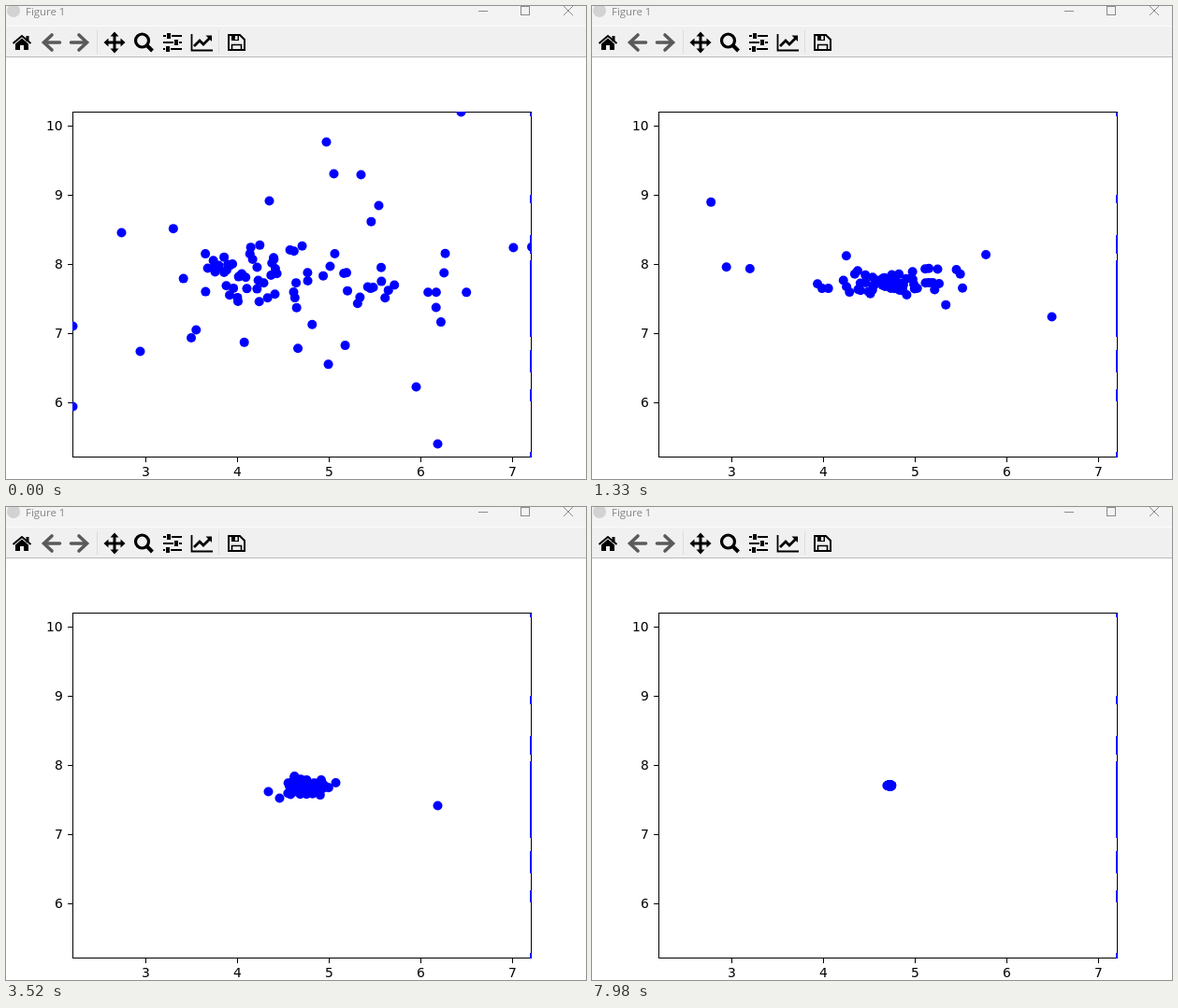
Animation, 620 px wide and 506 px high, one loop 8000 ms. Source, as an HTML page with a canvas:

```html
<!DOCTYPE html>
<html lang="en">
<head>
<meta charset="utf-8">
<title>Figure 1</title>
<style>
html, body { margin: 0; width: 100%; height: 100%; overflow: hidden; background: #fff; }
canvas { display: block; width: 620px; height: 506px; }
</style>
</head>
<body>
<canvas id="stage" width="620" height="506"></canvas>
<script>
const ctx = document.getElementById("stage").getContext("2d");
const LOOP = 8000, COUNT = 97, BLUE = "#0000ff", INK = "#000", BAR = "#f0f0f0";
const GOAL = [317, 297];
const AXES = { l: 71, t: 113, r: 561, b: 482 };
const LABEL = '13.89px "DejaVu Sans", sans-serif';

// The swarm moves in discrete iterations, held for one or two ticks each
const stepAt = t => Math.floor(Math.floor(t / 66.3 + 0.1) * 0.62 + 0.6);

// Shape of the swarm over time: a few stragglers, a wide cloud and a dense core.
// Clouds are [centre x, centre y, deviation x, deviation y, slope].
const POSES = [
  { t: 0, spread: 50, wide: [330, 303, 95, 32, 0], core: [255, 280, 32, 16, 0],
    far: [[486, 113], [342, 145], [350, 179], [379, 180], [281, 208], [398, 213],
      [438, 407], [461, 468], [71, 342], [71, 428], [143, 369], [123, 242]] },
  { t: 790, spread: 40, wide: [320, 297, 90, 18, 0.1], core: [315, 297, 22, 6, 0.12],
    far: [[71, 222], [78, 224], [124, 271], [281, 214], [561, 387], [493, 403],
      [489, 382], [532, 305], [476, 273], [464, 353]] },
  { t: 1990, spread: 18, wide: [310, 298, 40, 12, 0.1], core: [316, 298, 10, 4, 0.1],
    far: [[96, 333], [194, 302], [205, 271], [242, 241], [491, 404], [352, 348], [392, 308]] },
  { t: 3520, spread: 14, wide: [325, 299, 15, 4, 0.1], core: [314, 298, 6, 4, 0.05],
    far: [[461, 319], [280, 304], [292, 311]] },
  { t: 4850, spread: 8, wide: [310, 297, 10, 2.5, 0.1], core: [315, 297.5, 5, 1.2, 0.15],
    far: [[259, 291], [286, 283], [354, 312]] },
  { t: 5910, spread: 8, wide: [317, 298, 5, 4, 0.3], core: [317, 297.5, 3.5, 1, 0.1],
    far: [[272, 293]] },
  { t: 7980, spread: 4, wide: [318, 297.5, 1.6, 0.3, 0], core: [317.5, 297.5, 1, 0.3, 0], far: [] }
];

let seed = 11;
function random() {
  seed = (seed * 16807) % 2147483647;
  return seed / 2147483647;
}
const bell = () => 2 * (random() + random() + random()) - 3;

function scatter([cx, cy, sx, sy, slope]) {
  const dx = bell() * sx;
  return [cx + dx, cy + bell() * sy + dx * slope];
}

for (const pose of POSES) {
  pose.step = stepAt(pose.t);
  const edge = pose.far.length + pose.spread;
  pose.dots = Array.from({ length: COUNT }, (_, i) =>
    pose.far[i] || scatter(i < edge ? pose.wide : pose.core));
}
const phases = Array.from({ length: COUNT }, () => random() * 2 - 1);

// Each dot swings through the goal on its way from one pose to the next
function place(i, a, b, u) {
  const turns = [i % 3, ((i * 7) >> 2) % 3];
  return GOAL.map((c, k) => {
    const mid = a.dots[i][k] * (1 - u) + b.dots[i][k] * u;
    const angle = 2 * Math.PI * turns[k] * u + phases[i] * Math.sin(Math.PI * u);
    return c + (mid - c) * Math.cos(angle);
  });
}

function rect(color, x, y, w, h) {
  ctx.fillStyle = color;
  ctx.fillRect(x, y, w, h);
}

function disc(color, x, y, r) {
  ctx.fillStyle = color;
  ctx.beginPath();
  ctx.arc(x, y, r, 0, 2 * Math.PI);
  ctx.fill();
}

function line(color, width, ...pts) {
  ctx.strokeStyle = color;
  ctx.lineWidth = width;
  ctx.beginPath();
  for (let i = 0; i < pts.length; i += 2) ctx.lineTo(pts[i], pts[i + 1]);
  ctx.stroke();
}

function shape(color, ...pts) {
  ctx.fillStyle = color;
  ctx.beginPath();
  for (let i = 0; i < pts.length; i += 2) ctx.lineTo(pts[i], pts[i + 1]);
  ctx.fill();
}

// Text placed on whole pixels; align is the share of its width left of x
function text(str, x, y, font, color, align) {
  ctx.font = font;
  ctx.fillStyle = color;
  ctx.fillText(str, Math.round(x - ctx.measureText(str).width * align), y);
}

function drawTitleBar() {
  const grey = "#8a8a8a";
  rect("#f3f3f3", 0, 0, 620, 21);
  rect("#fbfbfb", 0, 21, 620, 1);
  disc("#d2d2d2", 8, 5, 7);
  text("Figure 1", 21, 10, '11.4px "Open Sans", sans-serif', "#858585", 0);
  line(grey, 1, 505, 5.5, 515, 5.5);
  ctx.strokeRect(550.5, 0.5, 9, 9);
  line(grey, 1, 596, 0, 606, 10);
  line(grey, 1, 606, 0, 596, 10);
}

function drawHome() {
  line(INK, 2, 7.5, 40, 17, 32, 26.5, 40);
  rect(INK, 21.5, 32, 3, 6);
  shape(INK, 17, 34.5, 24, 40.5, 24, 47, 19, 47, 19, 42, 15, 42, 15, 47, 10, 47, 10, 40.5);
}

function drawArrow(x, dir) {
  const grey = "#5a5a5a";
  ctx.lineCap = "round";
  line(grey, 3.6, x + dir * 8.5, 31, x, 39, x + dir * 8.5, 47);
  line(grey, 3.6, x + dir, 39, x + dir * 17, 39);
  ctx.lineCap = "butt";
}

function drawPan() {
  rect(INK, 108, 37.5, 16, 3);
  rect(INK, 114.5, 31, 3, 16);
  for (let i = 0; i < 4; i++) {
    ctx.save();
    ctx.translate(116, 39);
    ctx.rotate(i * Math.PI / 2);
    shape(INK, 0, -11.5, 4.5, -6.5, -4.5, -6.5);
    ctx.restore();
  }
}

function drawZoom() {
  ctx.strokeStyle = INK;
  ctx.lineWidth = 3.2;
  ctx.beginPath();
  ctx.arc(145.5, 37, 7, 0, 2 * Math.PI);
  ctx.stroke();
  line(INK, 4, 150.5, 42, 156.5, 48);
}

function drawSliders() {
  [174, 182, 173].forEach((x, i) => {
    const y = 32 + i * 7;
    rect(INK, 168, y - 1, 20, 2);
    rect(BAR, x - 3, y - 1, 6, 2);
    rect(INK, x - 2, y - 3, 4, 6);
  });
}

function drawChart() {
  line(INK, 1.8, 198.5, 30, 198.5, 47.5, 221, 47.5);
  line(INK, 2.8, 201, 43, 207, 37, 211, 41, 218, 34);
  shape(INK, 213.5, 31.5, 220, 31.5, 220, 38);
}

function drawSave() {
  line(INK, 2, 238, 31, 250, 31, 255, 36, 255, 47, 238, 47, 238, 30);
  rect(INK, 241, 31, 8, 6);
  rect(BAR, 245, 32, 2.5, 4);
  line(INK, 1.6, 241.5, 47, 241.5, 41.5, 251.5, 41.5, 251.5, 47);
}

function drawToolbar() {
  rect(BAR, 0, 22, 620, 32);
  rect("#b9b9b9", 0, 54, 620, 1);
  for (const x of [97, 227]) rect("#dcdcdc", x, 26, 1, 25);
  drawHome();
  drawArrow(40.5, 1);
  drawArrow(86.5, -1);
  drawPan();
  drawZoom();
  drawSliders();
  drawChart();
  drawSave();
}

function drawAxes() {
  const { l, t, r, b } = AXES;
  ctx.strokeStyle = INK;
  ctx.lineWidth = 1;
  ctx.strokeRect(l + 0.5, t + 0.5, r - l, b - t);
  for (let n = 3; n <= 7; n++) {
    const x = 149 + (n - 3) * 98;
    rect(INK, x, b + 1, 1, 5);
    text(n, x, 503, LABEL, INK, 0.5);
  }
  for (let n = 6; n <= 10; n++) {
    const y = 424 - (n - 6) * 74;
    rect(INK, l - 5, y, 5, 1);
    text(n, 61, y + 5, LABEL, INK, 1);
  }
}

function drawDots(t) {
  const { l, t: top, r, b: bottom } = AXES;
  const step = stepAt(t);
  let k = 0;
  while (k < POSES.length - 2 && step >= POSES[k + 1].step) k++;
  const a = POSES[k], b = POSES[k + 1];
  const u = Math.min(1, (step - a.step) / (b.step - a.step));
  ctx.save();
  ctx.beginPath();
  ctx.rect(l, top, r - l + 1, bottom - top + 1);
  ctx.clip();
  for (let i = 0; i < COUNT; i++) {
    const [x, y] = place(i, a, b, u);
    disc(BLUE, x + 0.5, y + 0.5, 5);
  }
  ctx.restore();
}

// Marks left on the right edge by dots that touched it
function drawMarks() {
  for (const [y, h] of [[114, 4], [202, 9], [245, 20], [272, 82], [368, 24], [410, 13], [477, 6]]) {
    rect(BLUE, 560, y, 2, h);
  }
}

function draw(now) {
  rect("#fff", 0, 0, 620, 506);
  drawTitleBar();
  drawToolbar();
  drawAxes();
  drawDots(now % LOOP);
  drawMarks();
  requestAnimationFrame(draw);
}
draw(0);
</script>
</body>
</html>
```
